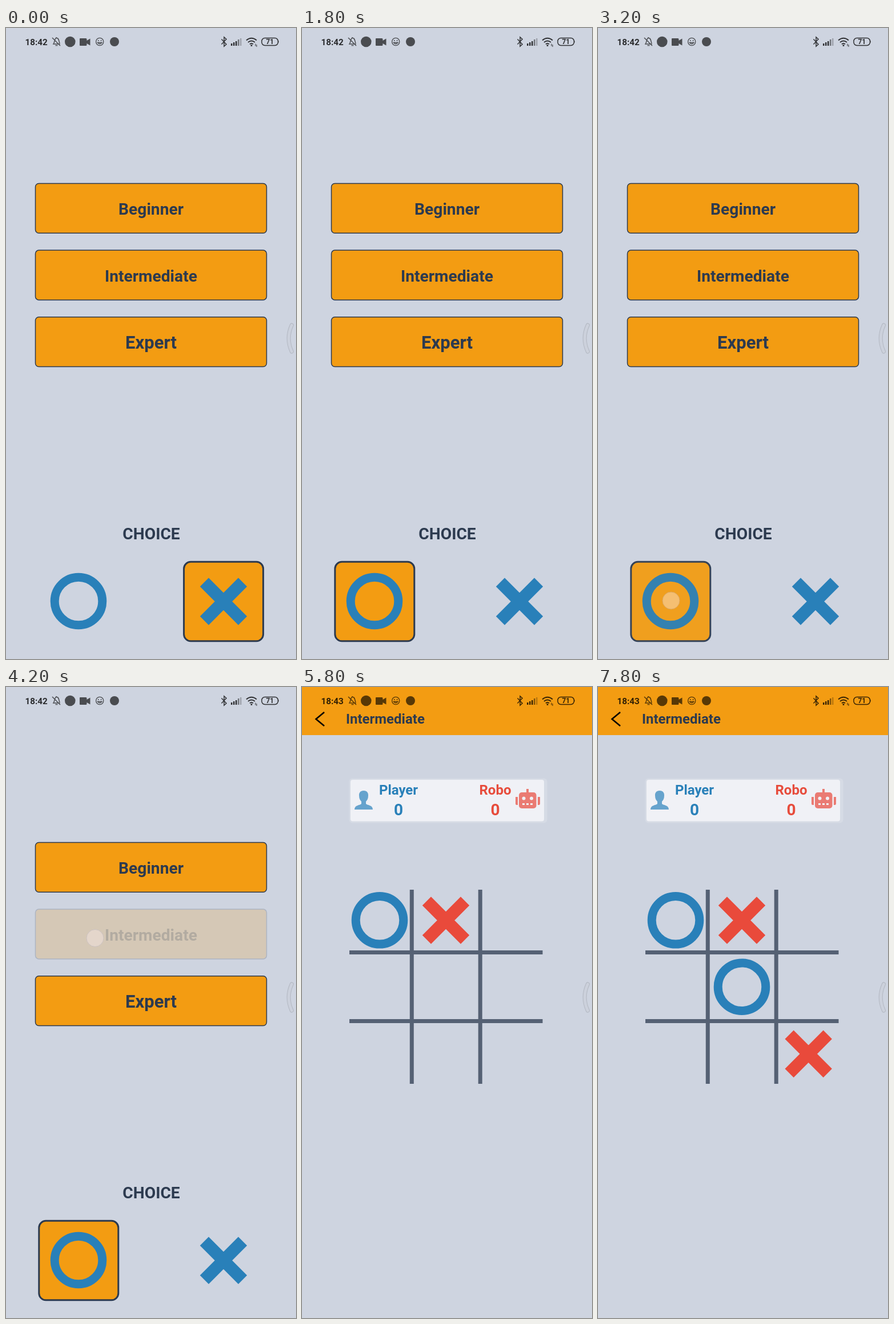
Animation, 508 px wide and 1102 px high, one loop 8000 ms. Source, as an HTML page:

```html
<!DOCTYPE html>
<html lang="en">
<head>
<meta charset="utf-8">
<title>Noughts and crosses</title>
<style>
  html, body { margin: 0; width: 100%; height: 100%; overflow: hidden; background: #ced4e0; }
  svg { display: block; width: 100%; height: 100%; }
  text { font-family: Roboto, sans-serif; font-weight: 700; }
  .mid { text-anchor: middle; }
  .fade > * { opacity: var(--o, 1); }
  .line { fill: none; stroke: #000; }
  .btn { fill: #f39c12; stroke: #2c3a4f; stroke-width: 1.5; }
  .tile { fill: #f39c12; stroke: #2c3a4f; stroke-width: 3; }
  .ring { fill: none; stroke: #2980b9; stroke-width: 15; }
  .cross { fill: none; stroke-width: 21.5; }
  .dark { fill: #2c3a4f; }
  .blue { fill: #2980b9; }
  .red { fill: #e74c3c; }
</style>
</head>
<body>
<svg viewBox="0 0 508 1102" preserveAspectRatio="none">
  <defs>
    <circle id="ring" class="ring" r="41.8"/>
    <path id="cross" class="cross" d="M-33.6-33.6 33.6 33.6M33.6-33.6-33.6 33.6"/>
    <clipPath id="reveal"><rect id="window" width="508" height="1102"/></clipPath>
  </defs>
  <rect width="508" height="1102" fill="#ced4e0"/>

  <g id="menu">
    <g id="levels"></g>
    <text class="mid dark" x="254.5" y="893" font-size="28.2">CHOICE</text>
    <g id="pickO" class="fade">
      <rect class="tile" x="57.8" y="932.3" width="139" height="138.5" rx="12"/>
      <use href="#ring" x="127" y="1001"/>
    </g>
    <g id="pickX" class="fade">
      <rect class="tile" x="311.6" y="932.3" width="139" height="138.5" rx="12"/>
      <use href="#cross" x="381" y="1001.5" stroke="#2980b9"/>
    </g>
  </g>
  <rect id="shade" width="508" height="1102" opacity=".1"/>

  <g id="game" clip-path="url(#reveal)">
    <g id="page">
      <rect width="508" height="1102" fill="#ced4e0"/>
      <rect width="508" height="84" fill="#f39c12"/>
      <path class="line" d="M39 44 24.5 56 39 68" stroke-width="2.6"/>
      <text class="dark" x="77" y="64" font-size="24">Intermediate</text>

      <rect x="82.5" y="159.5" width="347" height="78" rx="6" fill="#d6dbe5"/>
      <rect x="85" y="162" width="339" height="72.5" rx="4" fill="#f0f1f6"/>
      <g font-size="24">
        <text class="mid blue" x="169" y="188">Player</text>
        <text class="mid red" x="338.5" y="188">Robo</text>
      </g>
      <g font-size="28">
        <text class="mid blue" x="169" y="224">0</text>
        <text class="mid red" x="338.5" y="224">0</text>
      </g>
      <path fill="#66a3cd" d="M108 181c-6 0-8.500 4-8 9 0 5 2 8 4 10v4c-3 3-12 2-12 10h32c0-8-9-7-12-10v-4c2-2 4-5 4-10 .5-5-2-9-8-9z"/>
      <g fill="#ea7b73">
        <path d="M393 178h4v7h-4zM374 192h4v14h-2q-2 0-2-2zM413 192h4v12q0 2-2 2h-2z"/>
        <rect x="380" y="184" width="30.500" height="28" rx="5"/>
      </g>
      <g fill="#f0f1f6">
        <circle cx="388.500" cy="194.500" r="3"/><circle cx="402" cy="194.500" r="3"/>
        <path d="M386 203h4v3h-4zM393 203h4v3h-4zM400 203h4v3h-4z"/>
      </g>

      <path d="M192.300 354V693M312.200 354V693M83 463.500H421.500M83 583.500H421.500" fill="none" stroke="#556174" stroke-width="7"/>
      <g id="marks"></g>
    </g>
  </g>

  <path d="M500.500 519Q490 542 500.500 565" fill="none" stroke="#b3b8c2" stroke-width="7" stroke-linecap="round"/>
  <path d="M500.500 519Q490 542 500.500 565" fill="none" stroke="#ccd1dc" stroke-width="5" stroke-linecap="round"/>

  <g id="status">
    <text id="clock" x="33.500" y="29.800" font-size="15.200" opacity=".8"></text>
    <g opacity=".64">
      <path class="line" d="M82 28h12.500M83.500 27c2-2 1-9 5-9.500 4-.5 4 5 5.500 9.500M88 16v2M86.500 30.500h4M81 17l14 14" stroke-width="1.500"/>
      <circle cx="112.300" cy="24" r="9.300"/>
      <path d="M129 19q0-1 1-1h10q1.500 0 1.500 1.500v2.500l6-3.500v12l-6-3.500v2.500q0 1.500-1.500 1.500h-10q-1 0-1-1z"/>
      <circle class="line" cx="164.200" cy="24" r="6.600" stroke-width="1.300"/>
      <path class="line" d="M160.500 25.500q3.700 4.500 7.400 0z" stroke-width="1.300"/>
      <circle cx="161.800" cy="22" r="1"/><circle cx="166.600" cy="22" r="1"/>
      <circle cx="190" cy="24" r="8"/>
    </g>
    <g opacity=".76">
      <path class="line" d="M377.500 19.500 386 28.500 382 32V16l4 3.500-8.500 9" stroke-width="1.500"/>
      <g id="bars"></g>
      <path class="line" d="M421 21.500q9-7.500 18 0M424 25q6-5 12 0M427 28.200q3-2.500 6 0" stroke-width="1.900"/>
      <circle cx="430" cy="30.500" r="1.500"/>
      <path class="line" d="M437 27.500v4M439 29v4" stroke-width="1"/>
      <rect class="line" x="448" y="17.500" width="28.500" height="13" rx="5.500" stroke-width="1.500"/>
      <path d="M477.200 22q1.500 2 0 4z"/>
      <text class="mid" x="462.300" y="28.200" font-size="12">71</text>
    </g>
  </g>
  <circle id="dot" r="15" fill="#fff0f2" stroke="#b9b4d0" stroke-width="1"/>
</svg>

<script>
const LOOP = 8000, STEP = 200, H = 1102;
const $ = id => document.getElementById(id);

function add(parent, tag, attrs, label) {
  const el = document.createElementNS('http://www.w3.org/2000/svg', tag);
  for (const k in attrs) el.setAttribute(k, attrs[k]);
  if (label) el.textContent = label;
  return parent.appendChild(el);
}

const levels = [['Beginner', 28.2], ['Intermediate', 28.2], ['Expert', 31]].map(([name, size], i) => {
  const g = add($('levels'), 'g', { class: 'fade' }), y = 271.500 + i * 116.600;
  add(g, 'rect', { class: 'btn', x: 51.500, y, width: 405, height: 86.800, rx: 6 });
  add(g, 'text', { class: 'mid dark', x: 254, y: y + (i == 2 ? 55.500 : 54.500), 'font-size': size }, name);
  return g;
});

[4, 6, 8, 11, 13].forEach((h, i) =>
  add($('bars'), 'rect', { x: 394 + i * 4, y: 31 - h, width: 2.500, height: h, opacity: i < 3 ? 1 : i == 3 ? .6 : .3 }));

const marks = [
  { at: 5200, kind: 'ring', x: 136, y: 407.300 },
  { at: 5600, kind: 'cross', x: 252, y: 407.500 },
  { at: 6600, kind: 'ring', x: 252, y: 523.700 },
  { at: 7000, kind: 'cross', x: 368.700, y: 640.700 }
].map(m => ({ ...m, el: add($('marks'), 'use', { href: '#' + m.kind, x: m.x, y: m.y, stroke: '#e94a3b' }) }));

const taps = [
  { at: 1000, x: 127.500, y: 996, on: 'O', a: .62 },
  { at: 2000, x: 337, y: 1033, on: 'X', a: .62 },
  { at: 3000, x: 128, y: 1000, on: 'O', a: .62 },
  { at: 4200, x: 156, y: 438.500, on: 'level', a: .36 },
  { at: 5200, x: 136, y: 410, a: .5 },
  { at: 6600, x: 252, y: 526, a: .5 }
];
const targets = { O: $('pickO'), X: $('pickX'), level: levels[1] };

const show = (el, on) => el.setAttribute('visibility', on ? 'inherit' : 'hidden');
const shift = (el, y) => el.setAttribute('transform', `translate(0 ${y})`);

function draw(t) {
  // picked side and press feedback
  let side = 'X', dotAlpha = 0;
  const alpha = { O: 1, X: 1, level: 1 };
  for (const p of taps) {
    const age = t - p.at;
    if (age < 0) continue;
    if (p.on == 'O' || p.on == 'X') side = p.on;
    if (age >= 400) continue;
    if (p.on) alpha[p.on] = Math.min(1, .2 + age / 270);
    dotAlpha = p.a * (1 - age / 550);
    $('dot').setAttribute('cx', p.x);
    $('dot').setAttribute('cy', p.y);
  }
  if (t >= 4400 && t < 5000) dotAlpha = 0;
  $('dot').setAttribute('opacity', dotAlpha);
  for (const k in alpha) targets[k].style.setProperty('--o', alpha[k]);
  show($('pickO').firstElementChild, side == 'O');
  show($('pickX').firstElementChild, side == 'X');

  // the game screen is uncovered from below
  const u = Math.min(1, Math.max(0, (t - 4270) / 425));
  const rest = Math.pow(1 - u, 3.15);
  show($('game'), u > 0);
  show($('shade'), u > 0);
  $('window').setAttribute('y', H * rest);
  shift($('page'), H * .041 * rest);
  shift($('menu'), -H * .02 * (1 - rest));

  for (const m of marks) show(m.el, t >= m.at);
  $('clock').textContent = t < 5000 ? '18:42' : '18:43';
}

const start = performance.now();
function tick() {
  const t = (performance.now() - start) % LOOP;
  draw(Math.floor(t / STEP) * STEP);
  requestAnimationFrame(tick);
}
tick();
</script>
</body>
</html>
```
